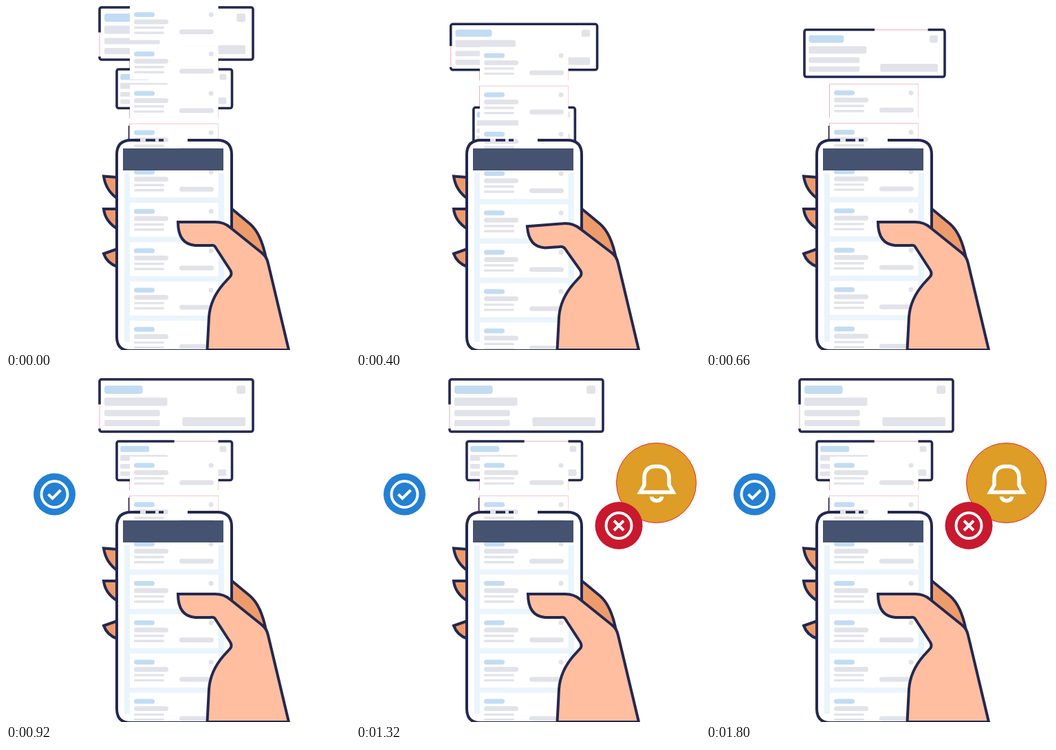
Write an HTML page with a canvas that moves like this. It is 500 px wide and 500 px high and loops after 2.6 s.

```html
<!DOCTYPE html>
<html lang="en">
<head>
<meta charset="utf-8">
<title>Phone cards</title>
<style>
html, body { margin: 0; width: 100%; height: 100%; overflow: hidden; background: #fff; }
canvas { display: block; width: 100vw; height: 100vh; }
</style>
</head>
<body>
<canvas id="stage" width="500" height="500"></canvas>
<script>
const ctx = document.getElementById('stage').getContext('2d');
const LOOP = 2600, STEP = 20, PITCH = 57.2, CARD_H = 49;
const NAVY = '#232850', LABEL = '#c2dcf2', GRAY = '#e2e3ea', PINK = '#f3a9b6',
      SKIN = '#ffbe9f', SHADE = '#ee9b6b', SCREEN = '#eaf4fc';

const clamp = v => Math.max(0, Math.min(1, v));
const span = (t, from, to) => clamp((t - from) / (to - from));
const mix = (a, b, p) => a + (b - a) * p;
const mixAll = (a, b, p) => a.map((v, i) => mix(v, b[i], p));
const easeOut = p => 1 - (1 - p) ** 3;
const backOut = p => 1 + 2.7 * (p - 1) ** 3 + 1.7 * (p - 1) ** 2;

function bezier(x1, y1, x2, y2) {
  const at = (s, a, b) => 3 * (1 - s) ** 2 * s * a + 3 * (1 - s) * s * s * b + s ** 3;
  return x => {
    let lo = 0, hi = 1;
    for (let i = 0; i < 24; i++) {
      const mid = (lo + hi) / 2;
      if (at(mid, x1, x2) < x) lo = mid; else hi = mid;
    }
    return at(hi, y1, y2);
  };
}
const scrollEase = bezier(0.36, 0.1, 0.4, 1);

function rounded(x, y, w, h, r) {
  ctx.beginPath();
  ctx.roundRect(x, y, w, h, r);
}
function pill(x, cy, w, h, color, r = h / 2) {
  rounded(x, cy - h / 2, w, h, r);
  ctx.fillStyle = color;
  ctx.fill();
}
function line(points, color, width) {
  ctx.beginPath();
  points.forEach(([x, y]) => ctx.lineTo(x, y));
  ctx.strokeStyle = color;
  ctx.lineWidth = width;
  ctx.stroke();
}
function disc(x, y, r, color) {
  ctx.beginPath();
  ctx.arc(x, y, r, 0, Math.PI * 2);
  ctx.fillStyle = color;
  ctx.fill();
}
function shape(path, fill, width = 4) {
  ctx.fillStyle = fill;
  ctx.fill(path);
  ctx.strokeStyle = NAVY;
  ctx.lineWidth = width;
  ctx.stroke(path);
}

// Content of a list card whose top is at y
function listContent(y) {
  pill(186, y + 12.5, 30, 7, LABEL);
  pill(186, y + 23, 50, 7, GRAY);
  pill(186, y + 31.5, 44, 3.4, GRAY);
  pill(186, y + 39, 44, 3.4, GRAY);
  pill(252, y + 37.5, 50, 7, GRAY);
  disc(298, y + 12.5, 3.5, GRAY);
}

// Large card in a box [x, y, w, h]; trim picks the side with the thin pink gap
function bigCard([x, y, w, h], trim) {
  rounded(x, y, w, h, 3);
  ctx.fillStyle = '#fff';
  ctx.fill();
  ctx.strokeStyle = NAVY;
  ctx.lineWidth = 3.6;
  ctx.stroke();
  const gap = trim === 'left'
    ? [[x, y + h * 0.48], [x, y + h * 0.94]]
    : [[x + w * 0.5, y], [x + w * 0.88, y]];
  line(gap, '#fff', 4.4);
  line(gap, PINK, 1);
  ctx.save();
  ctx.translate(x, y);
  ctx.scale(w / 224, h / 76);
  pill(7, 15, 56, 12, LABEL, 4);
  pill(7, 32.5, 92, 12, GRAY, 2);
  pill(7, 49, 81, 9, GRAY, 2);
  pill(7, 63.5, 81, 9, GRAY, 2);
  pill(121, 61.5, 92, 13, GRAY, 2);
  pill(200, 15, 13, 12, GRAY, 3);
  ctx.restore();
}

function boldCard([x, y, w, h]) {
  rounded(x, y, w, h, 3);
  ctx.fillStyle = '#fff';
  ctx.fill();
  ctx.save();
  ctx.clip();
  ctx.translate(x + 11.5, y - 1.5);
  ctx.scale(w / 128, w / 128);
  ctx.translate(-186, 0);
  listContent(0);
  ctx.restore();
  rounded(x, y, w, h, 3);
  ctx.strokeStyle = NAVY;
  ctx.lineWidth = 5;
  ctx.stroke();
}

const TOP = [136, 2, 223, 76], SECOND = [161, 92, 167.5, 56.5],
      BOLD = [138.5, 36.5, 208.5, 62.5], SETTLED = [143, 34.5, 204, 68.5];

function drawBigCards(t, scroll) {
  if (t < 480) {
    const p = scroll;
    bigCard(mixAll(SECOND, [180, 199, 129, 49], p), 'top');
  }
  if (t < 440) {
    bigCard(mixAll(TOP, BOLD, easeOut(span(t, 340, 520))), 'left');
  } else if (t < 600) {
    boldCard(mixAll(TOP, BOLD, easeOut(span(t, 340, 520))));
  } else {
    const p = easeOut(span(t, 780, 900));
    bigCard(mixAll(SETTLED, SECOND, p), 'top');
    if (p > 0) bigCard(mixAll([127, -84, 241, 82], TOP, p), 'left');
  }
}

function columnTops(scroll) {
  const tops = [];
  for (let y = 2 * PITCH * scroll; y < 500; y += PITCH) tops.push(y);
  return tops;
}

function drawColumnEdges(tops, resting) {
  ctx.strokeStyle = PINK;
  ctx.lineWidth = 1;
  for (const y of tops) {
    if (y < 194) ctx.strokeRect(179.5, y + 0.5, 129, CARD_H - 1);
    if (y < 194) line([[179, y - 0.3], [309, y - 0.3]], PINK, 1);
  }
  // Hide the lower edges, only sides and tops show
  ctx.fillStyle = '#fff';
  for (const y of tops) ctx.fillRect(180, y + CARD_H - 2, 128, 3);
  if (resting) line([[178.5, 174], [178.5, 194]], NAVY, 1.6);
}

function drawColumn(tops) {
  for (const y of tops) {
    ctx.fillStyle = '#fff';
    ctx.fillRect(180, y, 128.5, CARD_H + 0.5);
    listContent(y);
  }
}

const FINGERS = [
  'M162 249L142 247.500Q145 268 162 280Z',
  'M162 295L142 295Q144 313 162 324Z',
  'M162 353L142 360Q147 374 162 379Z'
].map(d => new Path2D(d));
const BACK_HAND = new Path2D('M326 293L355 317Q371 331 378 367L326 328Z');

function drawPhone(tops) {
  FINGERS.forEach(f => shape(f, SHADE));
  shape(BACK_HAND, SHADE);
  rounded(161, 195, 167, 306, 21);
  ctx.fillStyle = '#fff';
  ctx.fill();
  ctx.fillStyle = SCREEN;
  ctx.fillRect(172, 243, 145, 245);
}

function drawPhoneFrame() {
  ctx.fillStyle = '#455270';
  ctx.fillRect(170, 207, 146, 32);
  ctx.strokeStyle = NAVY;
  ctx.lineWidth = 4;
  ctx.stroke(new Path2D('M195 195H182Q161 195 161 216V481Q161 501 181 501H308Q328 501 328 481V216Q328 195 307 195H264'));
  line([[203, 195], [217, 195]], NAVY, 3.6);
  line([[222, 195], [229, 195]], NAVY, 3.6);
}

// Thumb outline at rest and pulled down, as flat x, y pairs
const THUMB_REST = [250, 314, 304, 314, 317, 314, 326, 322, 301, 348, 275, 348, 250, 346, 304, 350];
const THUMB_DOWN = [246, 336, 292, 322, 308, 317, 325, 328, 295, 355, 274, 360, 253, 362, 302, 358];

function drawHand(pull) {
  const v = mixAll(THUMB_REST, THUMB_DOWN, pull);
  ctx.beginPath();
  ctx.moveTo(v[0], v[1]);
  ctx.lineTo(v[2], v[3]);
  ctx.quadraticCurveTo(v[4], v[5], v[6], v[7]);
  ctx.lineTo(372, 359);
  ctx.quadraticCurveTo(379, 364, 381, 374);
  ctx.lineTo(411, 500);
  ctx.lineTo(292.5, 500);
  ctx.lineTo(295, 452);
  ctx.quadraticCurveTo(297, 426, 316, 404);
  ctx.lineTo(326, 393);
  ctx.quadraticCurveTo(329, 389, 326, 384);
  ctx.lineTo(v[14], v[15]);
  ctx.quadraticCurveTo(v[8] + 1, v[9] - 1, v[8] - 4, v[9]);
  ctx.lineTo(v[10], v[11]);
  ctx.quadraticCurveTo(v[12], v[13], v[0], v[1]);
  ctx.closePath();
  ctx.fillStyle = SKIN;
  ctx.fill();
  ctx.strokeStyle = NAVY;
  ctx.lineWidth = 4;
  ctx.stroke();
}

function ring(r) {
  ctx.beginPath();
  ctx.arc(0, 0, r, 0, Math.PI * 2);
  ctx.strokeStyle = '#fff';
  ctx.lineWidth = 4;
  ctx.stroke();
}
const BELL = new Path2D('M-23.500 13.500H24.500L18.500 3V-8C18.500-19 11-24 3-24H-2C-10-24-17.500-19-17.500-8V3Z');
const CLAPPER = new Path2D('M-7 20A7.500 6 0 0 0 8 20');

const ICONS = [
  { x: 70.5, y: 169, r: 30.5, color: '#2380d3', start: 780, draw() {
    ring(19);
    line([[-9, 0], [-3, 6], [9, -6]], '#fff', 4);
  } },
  { x: 436.5, y: 152.5, r: 58, color: '#dd9d26', rim: '#f5202c', start: 1080, draw() {
    ctx.strokeStyle = '#fff';
    ctx.lineWidth = 5.5;
    ctx.stroke(BELL);
    ctx.stroke(CLAPPER);
  } },
  { x: 382, y: 214.5, r: 34.5, color: '#c8192e', start: 1200, draw() {
    ring(18.5);
    line([[-7, -7], [7, 7]], '#fff', 4);
    line([[7, -7], [-7, 7]], '#fff', 4);
  } }
];

function drawIcons(t) {
  for (const icon of ICONS) {
    if (t <= icon.start) continue;
    const scale = backOut(span(t, icon.start, icon.start + 120));
    ctx.save();
    ctx.translate(icon.x, icon.y);
    ctx.scale(scale, scale);
    disc(0, 0, icon.r, icon.color);
    if (icon.rim) {
      ctx.strokeStyle = icon.rim;
      ctx.lineWidth = 1 / scale;
      ctx.stroke();
    }
    icon.draw();
    ctx.restore();
  }
}

function render(t) {
  const scroll = scrollEase(span(t, 200, 700));
  const pull = Math.sin(Math.PI * span(t, 200, 420));
  const tops = columnTops(scroll);
  ctx.lineJoin = 'miter';
  ctx.fillStyle = '#fff';
  ctx.fillRect(0, 0, 500, 500);
  drawColumnEdges(tops, t < 220 || t >= 640);
  drawBigCards(t, scroll);
  drawPhone();
  drawColumn(tops);
  drawPhoneFrame();
  drawHand(pull);
  drawIcons(t);
}

const begin = performance.now();
function tick() {
  const t = (performance.now() - begin) % LOOP;
  render(Math.floor(t / STEP) * STEP);
  requestAnimationFrame(tick);
}
tick();
</script>
</body>
</html>
```
